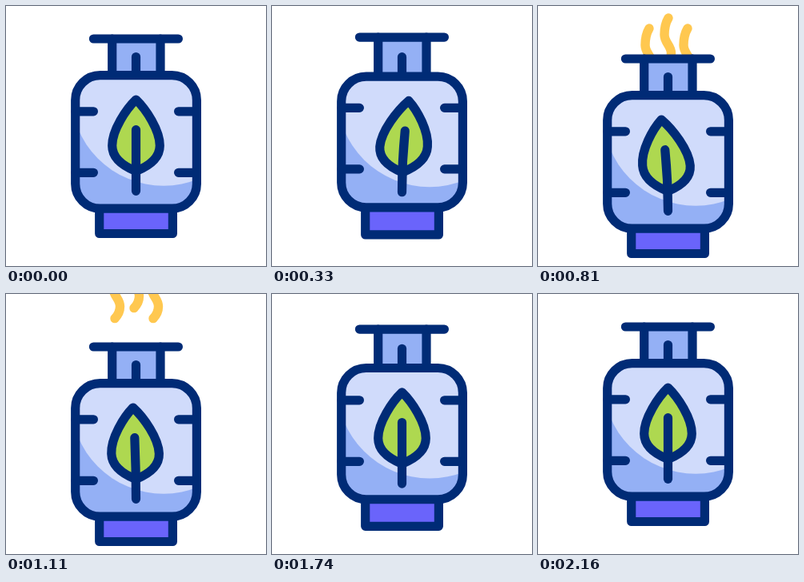
An HTML page for the animation above (2.25 s loop, 325 by 325 pixels).

```html
<!DOCTYPE html>
<html lang="en">
<head>
<meta charset="utf-8">
<title>Eco gas cylinder</title>
<style>
  html, body { margin: 0; width: 100%; height: 100%; overflow: hidden; background: #fff; }
  svg { display: block; width: 100vw; height: 100vh; }
  .line { fill: none; stroke: #002b76; stroke-width: 11.2; stroke-linecap: round; stroke-linejoin: round; }
  .smoke { fill: none; stroke: #ffc850; stroke-width: 11.4; stroke-linecap: round; stroke-linejoin: round; }
</style>
</head>
<body>
<svg viewBox="0 0 325 325">
  <defs>
    <clipPath id="tank"><rect class="shell" x="86.7" y="86.7" width="151.7" rx="31"/></clipPath>
    <path id="wisp" d="M0 0C4 -4 6.5 -9 6.5 -15C6.5 -25 -2 -28 -2 -38C-2 -48 0 -54 3 -59"/>
  </defs>
  <g id="smoke" class="smoke">
    <use href="#wisp" x="136" y="13"/>
    <use href="#wisp" x="160"/>
    <use href="#wisp" x="184" y="13"/>
  </g>
  <path id="neckFill" fill="#94b0f5"/>
  <path id="neck" class="line"/>
  <path id="bar" class="line" d="M109.4 41H215.4"/>
  <path id="spout" class="line" d="M162.5 63.5V87"/>
  <g id="body">
    <path class="line" style="fill:#6a64fb" d="M116.7 245V284.5H208.4V245Z"/>
    <g clip-path="url(#tank)">
      <rect x="86" y="86" width="153" height="170" fill="#94b0f5"/>
      <circle cx="197" cy="108.7" r="116" fill="#d0dbfb"/>
    </g>
    <rect class="line shell" x="86.7" y="86.7" width="151.7" rx="31"/>
    <path id="leaf" class="line" style="fill:#aed850"/>
    <path id="stem" class="line"/>
  </g>
  <path id="ticks" class="line" d="M87 131.8H109.4M87 208.3H109.4M215.6 131.8H238M215.6 208.3H238"/>
</svg>
<script>
  const LOOP = 2250, DROP = 25, MID = 162.5, ROOT = 231.3;
  const $ = id => document.getElementById(id);
  const shells = document.querySelectorAll('.shell');
  const ease = p => p * p * (3 - 2 * p);

  // keys: [time, value] pairs, eased between neighbours
  function track(t, keys) {
    if (t <= keys[0][0]) return keys[0][1];
    for (let i = 1; i < keys.length; i++) {
      const [t0, v0] = keys[i - 1], [t1, v1] = keys[i];
      if (t < t1) return v0 + (v1 - v0) * ease((t - t0) / (t1 - t0));
    }
    return keys[keys.length - 1][1];
  }

  const hop = (t, peak) => track(t, [
    [0, 0], [180, peak], [540, DROP], [1590, DROP], [1890, peak], [2160, 0]
  ]);
  const sway = t => track(t, [[0, 0], [480, 10.8], [870, -9.5], [1290, 0]]);

  const shift = (id, y) => $(id).setAttribute('transform', `translate(0 ${y})`);
  const draw = (id, d) => $(id).setAttribute('d', d);

  function drawLeaf(lean) {
    // sideways bend grows with the square of the height above the root
    const at = (dx, y) => `${MID + dx + lean * ((ROOT - y) / 114) ** 2} ${y}`;
    const side = s => [
      at(-12.5 * s, 129), at(-29.8 * s, 155), at(-29.8 * s, 174.5),
      at(-29.8 * s, 191), at(-15 * s, 200.5), at(0, 206.5)
    ];
    const left = side(1);
    const right = side(-1).reverse().slice(1);
    draw('leaf', `M${at(0, 117)}C${left.join(' ')}C${right.join(' ')} ${at(0, 117)}Z`);
    draw('stem', `M${at(0, 154.7)}Q${MID} ${(154.7 + ROOT) / 2} ${MID} ${ROOT}`);
  }

  function render(t) {
    const body = hop(t, -13), bar = hop(t, -18.5);
    shift('body', body);
    shift('bar', bar);
    shift('spout', hop(t, -15));
    shift('ticks', hop(t, -22.5));

    // the tank floor travels further than its top, squashing the tank
    const height = 166.5 + hop(t, -17.5) - body;
    shells.forEach(shell => shell.setAttribute('height', height));

    const top = 41 + bar, foot = 87 + body;
    draw('neckFill', `M132.7 ${top}H193V${foot + 6}H132.7Z`);
    draw('neck', `M132.7 ${top}V${foot}M193 ${top}V${foot}`);
    drawLeaf(sway(t));

    const rising = t >= 540 && t < 1320;
    $('smoke').style.display = rising ? '' : 'none';
    shift('smoke', 17.8 + (1110 - t) * 0.188);
  }

  const start = performance.now();
  function tick() {
    render((performance.now() - start) % LOOP);
    requestAnimationFrame(tick);
  }
  tick();
</script>
</body>
</html>
```
